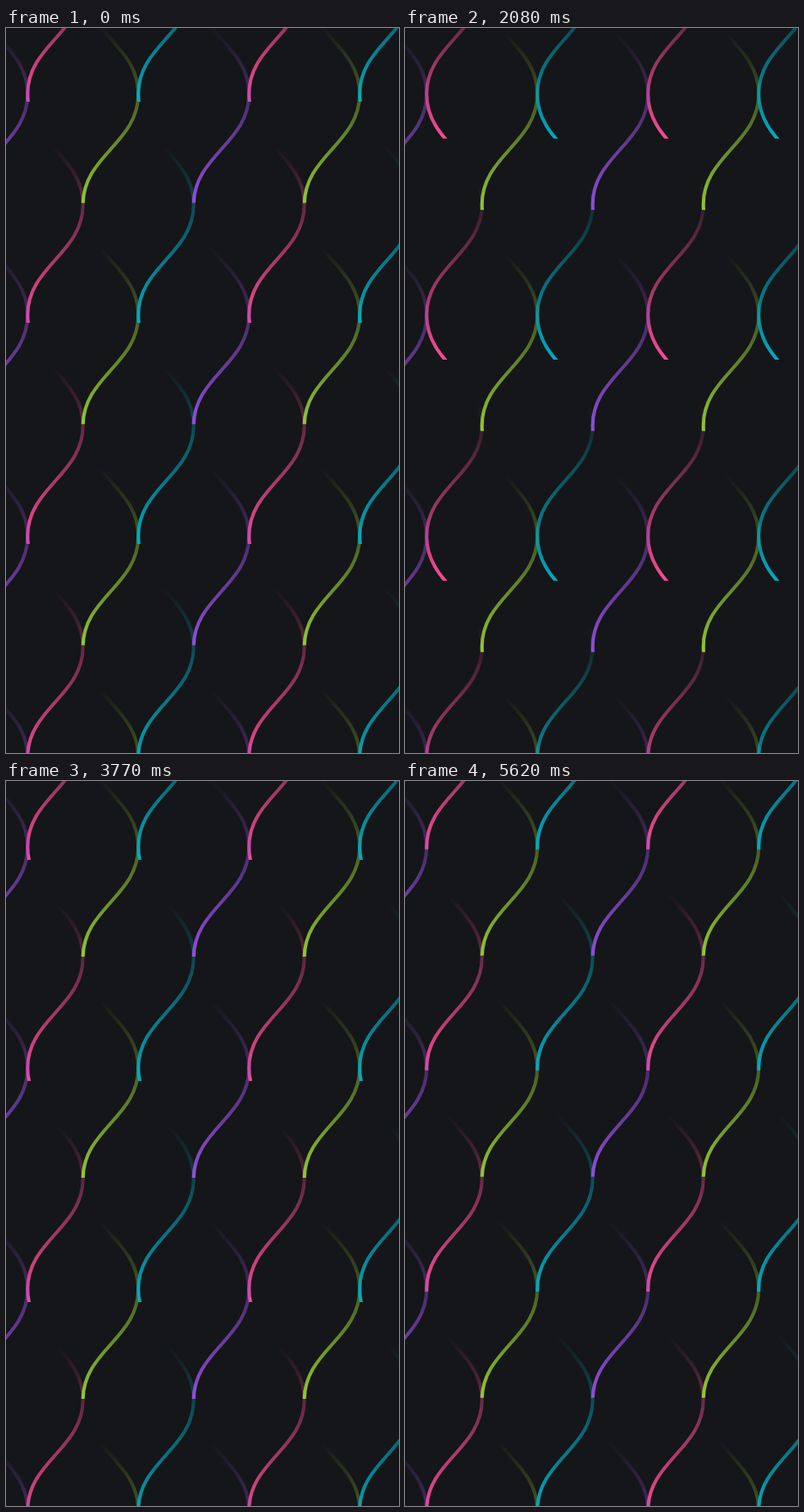
Recreate the animation shown at these times as an HTML page with a canvas. Size 458 by 846 pixels, loop 5690 ms.

```html
<!DOCTYPE html>
<html lang="en">
<head>
<meta charset="utf-8">
<title>Waves</title>
<style>
  html, body { margin: 0; width: 100%; height: 100%; overflow: hidden; background: #151619; }
  canvas { display: block; width: 458px; height: 846px; }
</style>
</head>
<body>
<canvas id="stage" width="458" height="846"></canvas>
<script>
const ctx = document.getElementById('stage').getContext('2d');
const W = 458, H = 846;
const LOOP = 5690;
const TILE = 258, HALF = TILE / 2, SWING = TILE / 4;
const STEP = 938.5;       // time a head takes from one bend to the next
const TAIL = 206;
const TOP = -52;          // first bend, above the stage
const BEND = 57;          // bezier handle length
const LEFT = 25.2;

// Each step runs between two bends; the two pairs of strands ease differently.
function headAt(t, delay, ease, startY) {
  const steps = (t - delay) / STEP;
  const whole = Math.floor(steps);
  return startY + HALF * (whole + ease(steps - whole));
}
const rush = u => Math.pow(u, 0.62);
const swing = u => (1 - Math.cos(Math.PI * u)) / 2;
const early = t => headAt(t, -12, rush, 77);
const late = t => headAt(t, 71, swing, 206);

// x at the first bend, direction of the first swing
const strands = [
  { rgb: '248,77,150', x: LEFT + SWING, dir: -1, head: early },
  { rgb: '146,200,50', x: LEFT + SWING, dir: 1, head: late },
  { rgb: '0,172,194', x: LEFT + 3 * SWING, dir: -1, head: early },
  { rgb: '146,78,220', x: LEFT + 3 * SWING, dir: 1, head: late }
];

function wavePath({ x, dir }) {
  const path = new Path2D();
  for (let left = x - TILE; left < W + SWING; left += TILE) {
    let from = left, to = left + dir * SWING;
    path.moveTo(from, TOP);
    for (let y = TOP; y < H; y += HALF) {
      path.bezierCurveTo(from, y + BEND, to, y + HALF - BEND, to, y + HALF);
      [from, to] = [to, from];
    }
  }
  return path;
}
strands.forEach(s => { s.path = wavePath(s); });

function drawStrand(s, t) {
  const first = s.head(t) % TILE;
  for (let y = first - TILE; y - TAIL < H; y += TILE) {
    if (y <= 0) continue;
    const fade = ctx.createLinearGradient(0, y - TAIL, 0, y);
    fade.addColorStop(0, `rgba(${s.rgb},0)`);
    fade.addColorStop(1, `rgba(${s.rgb},1)`);
    ctx.save();
    ctx.beginPath();
    ctx.rect(0, y - TAIL, W, TAIL);
    ctx.clip();
    ctx.strokeStyle = fade;
    ctx.stroke(s.path);
    ctx.restore();
  }
}

function drawLabel() {
  ctx.fillStyle = '#fff';
  ctx.fillRect(437, 0, 21, 11);
  ctx.save();
  ctx.translate(455, 6);
  ctx.rotate(-Math.PI / 2);
  ctx.fillStyle = '#222';
  ctx.font = '12px "Liberation Sans", sans-serif';
  ctx.fillText('S', 0, 0);
  ctx.restore();
}

function draw(t) {
  ctx.fillStyle = '#151619';
  ctx.fillRect(0, 0, W, H);
  ctx.lineWidth = 4;
  strands.forEach(s => drawStrand(s, t));
  if (t >= 4610 && t < 4850) drawLabel();
}

const start = performance.now();
function tick() {
  draw((performance.now() - start) % LOOP);
  requestAnimationFrame(tick);
}
tick();
</script>
</body>
</html>
```
